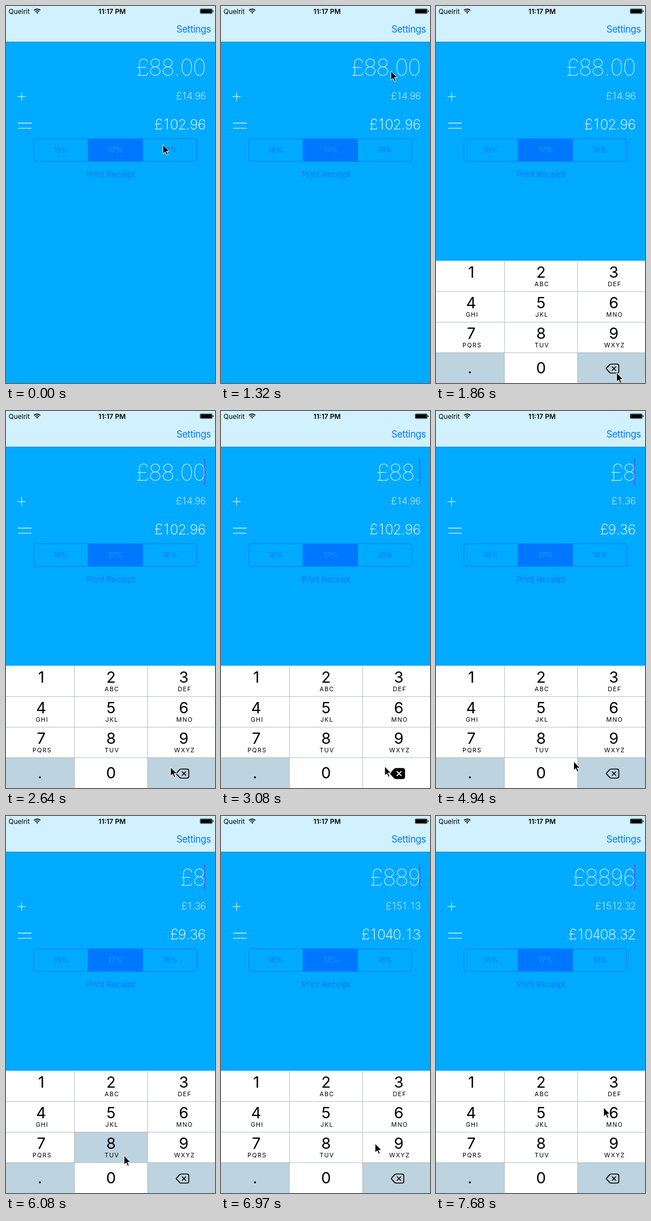
Write an HTML page that moves like this. It is 371 by 666 pixels and loops after 8 s.

```html
<!DOCTYPE html>
<html lang="en">
<head>
<meta charset="utf-8">
<title>Tip calculator</title>
<style>
  html, body { margin: 0; width: 100%; height: 100%; overflow: hidden; background: #0af; }
  svg { display: block; width: 371px; height: 666px; font-family: Inter, Roboto, sans-serif; }
  .mid, .amount { text-anchor: middle; }
  .amount { fill: #fff; }
  .blue { fill: #07f; }
  .line { fill: none; stroke: #fff; }
  .digit { font-size: 27.5px; }
  .letters { font-size: 10.8px; letter-spacing: 1.25px; }
</style>
</head>
<body>
<svg viewBox="0 0 371 666">
  <rect width="371" height="666" fill="#0af"/>
  <rect width="371" height="63" fill="#d1f1ff"/>
  <rect y="63" width="371" height="1" fill="#3f8db3"/>

  <text x="4.5" y="13.5" font-size="12">Quelrit</text>
  <g fill="none" stroke="#000" stroke-width="1.7">
    <path d="M49.7 7.7a8 8 0 0 1 11.2 0M51.8 10a5 5 0 0 1 7 0"/>
    <path d="M53.5 11.5a2.6 2.6 0 0 1 3.6 0L55.3 13.4z" fill="#000" stroke="none"/>
  </g>
  <text class="mid" x="188.3" y="13.5" font-size="12.2" font-weight="600">11:17 PM</text>
  <rect x="344.4" y="4.8" width="22" height="8.8" rx="1.8" fill="none" stroke="#000" stroke-width=".5"/>
  <rect x="345.2" y="5.6" width="20.4" height="7.2" rx="1"/>
  <path d="M367.2 7.6q1.4 .3 1.4 1.6t-1.4 1.6z"/>
  <text class="blue" x="302.5" y="47" font-size="16.6" letter-spacing="-.35">Settings</text>

  <text id="bill" class="amount" font-weight="100"></text>
  <text id="tip" class="amount" font-weight="200"></text>
  <text id="total" class="amount" font-weight="150"></text>
  <path class="line" d="M20.3 160h14.7M27.7 152.5v15"/>
  <path class="line" stroke-width="1.2" d="M21.5 206.9h24M21.5 216h24"/>
  <rect id="caret" x="351.7" y="84" width="2.2" height="47" fill="#426bf2"/>

  <rect x="49.5" y="234.5" width="289" height="40" rx="4" fill="none" stroke="#07f"/>
  <rect class="blue" x="145" y="234" width="98" height="41"/>
  <g class="mid" font-size="13">
    <text class="blue" x="97.5" y="259">16%</text>
    <text x="194.5" y="259" fill="#0af">17%</text>
    <text class="blue" x="291.5" y="259">18%</text>
  </g>
  <text class="mid blue" x="186.3" y="303" font-size="14.8" letter-spacing="-.15">Print Receipt</text>

  <g id="pad"></g>
  <path id="cursor" d="M.7 0v16l3.7-3.5 2.6 6 2.5-1.1-2.6-5.8h5z" stroke="#fff" stroke-linejoin="round"/>
</svg>
<script>
const LOOP = 8000, GREY = '#bdd3df';
const el = id => document.getElementById(id);

// Bill text from each moment on
const edits = [[0, '88.00'], [1330, '88.00'], [2720, '88.0'], [3080, '88.'], [3440, '88'],
  [4680, '8'], [6170, '88'], [6780, '889'], [7680, '8896']];
// Visible key presses: key, start, end
const presses = [['del', 2720, 2810], ['del', 3080, 3170], ['del', 3440, 3530],
  ['8', 6080, 6170], ['6', 7590, 7680]];
// Pointer: time, x, y
const path = [[0, 278, 245], [90, 278, 245], [400, 316, 175], [700, 305, 113], [790, 301, 115],
  [1480, 301, 115], [1850, 320, 648], [2200, 320, 648], [2450, 296, 632], [2700, 290, 628],
  [3710, 290, 628], [3800, 261, 606], [4000, 228, 602], [4400, 258, 625], [4590, 268, 627],
  [4800, 268, 627], [5200, 199, 604], [5630, 213, 606], [5720, 209, 600], [6260, 209, 600],
  [6530, 269, 589], [6900, 269, 589], [7410, 297, 515], [LOOP, 297, 515]];

const keys = ['1', '2', '3', '4', '5', '6', '7', '8', '9', '.', '0', 'del'];
const letters = ['', 'ABC', 'DEF', 'GHI', 'JKL', 'MNO', 'PQRS', 'TUV', 'WXYZ'];
const edges = [0, 121, 251, 371], centres = [62.5, 186.5, 315.5];

el('pad').innerHTML = keys.map((key, i) => {
  const col = i % 3, y = 450 + 54 * (i / 3 | 0), x = centres[col];
  const label = key == 'del'
    ? `<g id="icon" stroke-linejoin="round" stroke-linecap="round" stroke-width="1.6">
        <path d="M302 640.5l6-6.6q1.4-1.4 3-1.4h10.5q3 0 3 3v10q0 3-3 3H311q-1.6 0-3-1.4z" stroke="#000"/>
        <path id="cross" d="M312.7 637.3l6.4 6.4m0-6.4l-6.4 6.4"/></g>`
    : `<text class="mid digit" x="${key == '.' ? 60.2 : x}" y="${y + (i > 8 ? 37 : 30)}">${key}</text>
       <text class="mid letters" x="${x + 1.6}" y="${y + 45}">${letters[i] || ''}</text>`;
  return `<rect id="key${key}" x="${edges[col]}" y="${y}" width="${edges[col + 1] - edges[col]}" height="54"/>${label}`;
}).join('') + '<path d="M0 504.5h371M0 558.5h371M0 612.5h371M121.5 450v216M251.5 450v216" stroke="#a9b1b7" stroke-width=".8"/>';

// Right-aligned figures on an even pitch, with half-width points
function amount(id, text, y, size) {
  let x = 354.5;
  const xs = [...text].reverse().map(c => {
    const w = size * (c == '.' ? .278 : .556);
    x -= w;
    return (x + w / 2).toFixed(2);
  });
  const node = el(id);
  node.setAttribute('x', xs.reverse().join(' '));
  node.setAttribute('y', y);
  node.setAttribute('font-size', size);
  node.textContent = text;
}

function pointer(t) {
  const i = path.findIndex(p => p[0] > t);
  const [t0, x0, y0] = path[i - 1], [t1, x1, y1] = path[i];
  const k = (t - t0) / (t1 - t0);
  return [x0 + (x1 - x0) * k, y0 + (y1 - y0) * k];
}

function draw(t) {
  const [since, bill] = edits.filter(e => e[0] <= t).pop();
  amount('bill', '£' + bill, 122.7, 40.2);
  amount('tip', '£' + (bill * .17).toFixed(2), 164.8, 17.1);
  amount('total', '£' + (bill * 1.17).toFixed(2), 218, 25.1);
  el('caret').setAttribute('visibility', t >= 1330 && (t - since) % 960 < 520 ? 'visible' : 'hidden');

  const rise = Math.min(1, Math.max(0, (t - 1330) / 400));
  el('pad').setAttribute('transform', `translate(0 ${216 * (1 - rise) ** 3})`);

  const down = (presses.find(p => t >= p[1] && t < p[2]) || [])[0];
  keys.forEach(key => {
    const grey = (key == '.' || key == 'del') != (key == down);
    el('key' + key).setAttribute('fill', grey ? GREY : '#fff');
  });
  const pressed = down == 'del';
  el('icon').setAttribute('fill', pressed ? '#000' : 'none');
  el('icon').setAttribute('transform', pressed ? 'translate(313.5 640.5) scale(1.12) translate(-313.5 -640.5)' : '');
  el('cross').setAttribute('stroke', pressed ? '#fff' : '#000');

  el('cursor').setAttribute('transform', `translate(${pointer(t)})`);
}

const start = performance.now();
(function tick() {
  draw((performance.now() - start) % LOOP);
  requestAnimationFrame(tick);
})();
</script>
</body>
</html>
```
